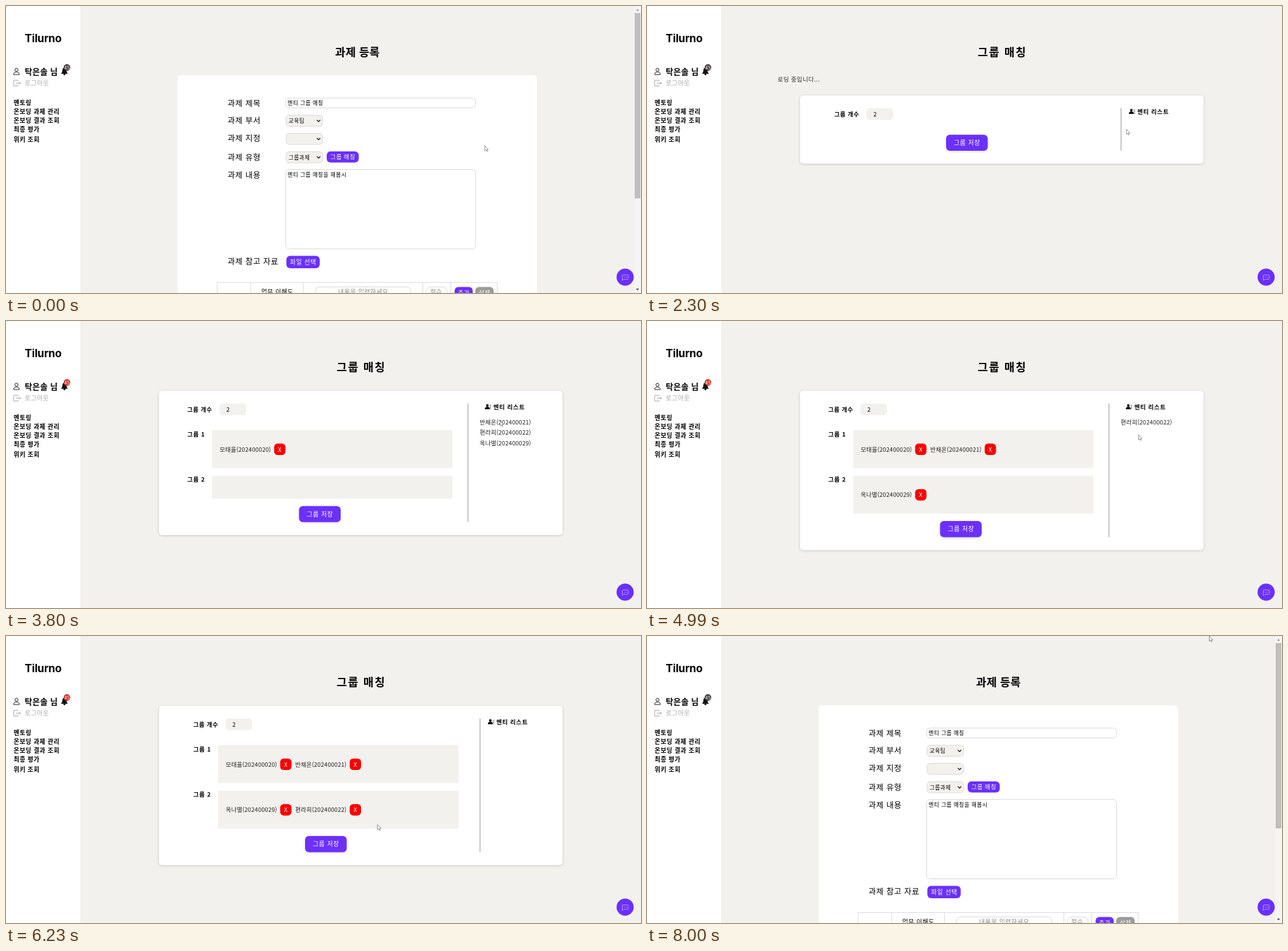
These frames come from a looping animation (1000 by 452 pixels, 8.11 s). An HTML page:

```html
<!DOCTYPE html>
<html lang="ko">
<head>
<meta charset="utf-8">
<title>그룹 매칭</title>
<style>
  html, body { margin: 0; width: 100%; height: 100%; overflow: hidden; background: #f3f1ed; }
  svg { display: block; width: 1000px; height: 452px; }
  text { font-family: "Noto Sans CJK KR", "Noto Sans CJK", "Noto Sans", sans-serif; white-space: pre; }
  .logo { font-family: Inter, sans-serif; }
  .raised { filter: drop-shadow(0 1.5px 2px rgba(0, 0, 0, .16)); }
</style>
</head>
<body>
<svg viewBox="0 0 1000 452">
  <g id="page"></g>
  <g id="sidebar"></g>
  <g id="chat">
    <circle cx="975" cy="427" r="13.5" fill="#6b30fa"/>
    <path d="M971.5 423.5h7q1.5 0 1.5 1.5v4q0 1.5-1.5 1.5h-5.5l-2.5 1.5v-7q0-1.5 1-1.5Z"
      fill="none" stroke="#cfc0ff" stroke-width=".7"/>
    <path d="M972.8 427h5" stroke="#cfc0ff" stroke-width=".9" stroke-dasharray="1 1"/>
  </g>
  <path id="cursor" d="M0 0V8.2L1.9 6.5L3.2 9.2L4.3 8.7L3.1 6.1H5.5Z"
    fill="#fff" stroke="#666" stroke-width=".7"/>
</svg>
<script>
const LOOP = 8110;
const PURPLE = '#6b30fa', FIELD = '#f3f1ed', BORDER = '#dadada';
const OPENED = 2040, LOADED = 2420, SAVED = 6600;

// Text is placed by its left edge (or anchor) and vertical centre.
function text(x, cy, content, size, { weight = 400, fill = '#000', gap = .5, anchor = 'start', cls = '' } = {}) {
  return `<text class="${cls}" x="${x}" y="${cy + size * .38}" font-size="${size}" font-weight="${weight}"
    fill="${fill}" letter-spacing="${gap}" text-anchor="${anchor}">${content}</text>`;
}
function box(x, y, w, h, r, fill, stroke = 'none', cls = '') {
  return `<rect class="${cls}" x="${x}" y="${y}" width="${w}" height="${h}" rx="${r}" fill="${fill}" stroke="${stroke}"/>`;
}
function path(d, stroke = '#111', width = 1, fill = 'none') {
  return `<path d="${d}" stroke="${stroke}" stroke-width="${width}" fill="${fill}"/>`;
}
function button(x, y, w, h, label, size, fill = PURPLE, cls = '') {
  return box(x, y, w, h, 6, fill, 'none', cls) +
    text(x + w / 2 + .3, y + h / 2, label, size, { fill: '#fff', anchor: 'middle', gap: .6 });
}

function sidebar(alert) {
  const menu = [['멘토링', 152], ['온보딩 과제 관리', 166], ['온보딩 결과 조회', 180.5], ['최종 평가', 194.5], ['위키 조회', 210]];
  return box(0, 0, 117, 452, 0, '#fff') +
    text(58.5, 51, 'Tilurno', 17, { weight: 700, gap: -.2, anchor: 'middle', cls: 'logo' }) +
    '<circle cx="16.5" cy="100.5" r="2.5" fill="none" stroke="#222"/>' +
    path('M12 108q0-4 4.5-4t4.5 4Z', '#222') +
    text(29.5, 103, '탁은솔 님', 12.8, { weight: 700, gap: .3 }) +
    path('M87 106.5q2-2 2-5q0-4 3-4t3 4q0 3 2 5Z', '#111', .5, '#111') +
    '<circle cx="92" cy="107.5" r="1.5"/>' +
    `<circle cx="96" cy="96.8" r="5.2" fill="${alert ? '#cc3024' : '#40383a'}"/>` +
    text(96, 97, '45', 7.5, { fill: '#fff', gap: 0, anchor: 'middle' }) +
    path('M19 118.5V117H12v9h7v-1.5M15.5 121.5H23M20.7 119.5l2.3 2l-2.3 2', '#aaa') +
    text(29.5, 121, '로그아웃', 10, { fill: '#aaa', gap: .3 }) +
    menu.map(([label, y]) => text(12, y, label, 9.7, { weight: 700, gap: .5 })).join('');
}

function select(y, value) {
  return box(441, y, 57.5, 17.5, 5, FIELD, '#dcdad6') + text(445, y + 9, value, 8.6) +
    path(`M489.5 ${y + 7.5}l2.7 2.7l2.7-2.7`, '#111', 1.3);
}

function formPage() {
  const labels = [['제목', 153], ['부서', 180], ['지정', 208.5], ['유형', 238], ['내용', 266], ['참고 자료', 402.5]];
  const hint = { fill: '#888' };
  return text(553.5, 72, '과제 등록', 17.5, { weight: 700, gap: .2, anchor: 'middle' }) +
    box(270, 109, 566, 400, 6, '#fff') +
    labels.map(([label, y]) => text(349, y, '과제 ' + label, 12.5)).join('') +
    box(440.5, 145, 299, 15.5, 5, '#fff', BORDER) + text(443.5, 152.5, '멘티 그룹 매칭', 8.6) +
    select(172, '교육팀') + select(200.5, '') + select(229.5, '그룹과제') +
    button(505, 229, 50.5, 17.5, '그룹 매칭', 9.2) +
    box(440.5, 257.5, 299, 125, 5, '#fff', BORDER) + text(443.5, 266, '멘티 그룹 매칭을 해봅시', 8.6) +
    button(441.5, 393.5, 52.5, 19.5, '파일 선택', 9.8) +
    path('M332 435.5H774M332.5 435V452M385.5 435V452M468.5 435V452M656.5 435V452M700.5 435V452M773.5 435V452', '#ddd') +
    text(402, 450, '업무 이해도', 9.8) +
    box(487.5, 442.5, 150, 18, 6, '#fff', BORDER) + text(523, 450.5, '내용을 입력하세요', 9.8, hint) +
    box(662, 442.5, 32.5, 18, 6, '#fff', BORDER) + text(668, 450.5, '점수', 9.8, hint) +
    button(706.5, 442.5, 28.5, 17, '추가', 9.4) + button(739, 442.5, 29, 17, '삭제', 9.4, '#9b9b9b') +
    box(989, 0, 11, 452, 0, '#f5f5f5') + box(990, 11, 9, 292, 0, '#bfbfbf') +
    path('M992 7.5h5l-2.5-3Z', 'none', 0, '#999') + path('M992 445h5l-2.5 3Z', 'none', 0, '#555');
}

const people = {
  mo: '모태율(202400020)', ban: '반채온(202400021)', pyeon: '편라희(202400022)', ok: '옥나별(202400029)'
};
const drops = [[3530, 'mo', 0], [4090, 'ban', 0], [4450, 'ok', 1], [5400, 'pyeon', 1]];

function member(id, x, cy) {
  return text(x, cy, people[id], 9.3, { gap: .18, fill: '#222' }) +
    box(x + 85.8, cy - 9, 17.8, 18, 5.5, '#f80000') +
    text(x + 94.7, cy + .3, 'X', 9, { fill: '#fff', gap: 0, anchor: 'middle' });
}

function groupPage(loaded, dropped) {
  const top = loaded ? 110 : 141;
  const waiting = loaded ? Object.keys(people).filter(id => !dropped.some(d => d[1] === id)) : [];
  const shift = waiting.length ? 0 : 9.5;
  const bold = { weight: 700, gap: .65 };
  let y = top + 62, groups = '';
  for (const index of loaded ? [0, 1] : []) {
    const members = dropped.filter(d => d[2] === index);
    const height = members.length ? 59.7 : 36;
    groups += text(285.5 + shift, y + 6, '그룹 ' + (index + 1), 9.4, bold) +
      box(324.5 + shift, y, 378.5, height, 0, FIELD) +
      members.map((d, i) => member(d[1], 336.5 + shift + i * 109.5, y + 30)).join('');
    y += height + 12;
  }
  const iconX = 754 + shift / 2, iconY = top + 25;
  return text(559.5, 72, '그룹 매칭', 17.5, { weight: 700, gap: 1.6, anchor: 'middle' }) +
    (loaded ? '' : text(205.5, 115.5, '로딩 중입니다...', 9.6, { gap: .3, fill: '#333' })) +
    box(241, top, 635.5, y + 45.3 - top, 5, '#fff', 'none', 'raised') +
    text(285.5 + shift, top + 29.5, '그룹 개수', 9.2, { weight: 700, gap: .55 }) +
    box(336 + shift, top + 20, 42, 18.5, 5, FIELD) + text(347 + shift, top + 30, '2', 9.2) +
    groups +
    button(461.5 + shift, y - .3, 65.5, 25.3, '그룹 저장', 9.8, PURPLE, 'raised') +
    path(`M${727.5 + shift * 2} ${top + 20}V${y + 25}`, '#999') +
    `<circle cx="${iconX + 4}" cy="${iconY - 2}" r="2"/>` +
    path(`M${iconX} ${iconY + 4}q0-4 4-4t4 4Z`, 'none', 0, '#111') +
    path(`M${iconX + 7.5} ${iconY - 2}h2.5m-2 2.5h2m-1.5 2.5h1.5`, '#333', .9) +
    text(767.5 + shift / 2, top + 25.5, '멘티 리스트', 9.4, bold) +
    waiting.map((id, i) => text(746, top + 49 + i * 16.5, people[id], 9.3, { gap: .18, fill: '#222' })).join('');
}

// Pointer stops: time, x, y.
const stops = [
  [0, 754, 220], [30, 754, 220], [710, 774, 189], [1220, 774, 189], [1800, 536, 239], [1910, 530, 240],
  [2040, 552, 235], [2300, 755, 194], [2420, 755, 194], [2720, 780, 160], [2970, 780, 160], [3040, 750, 165],
  [3250, 750, 165], [3500, 480, 190], [3560, 480, 190], [3800, 778, 157], [3940, 778, 157], [4090, 510, 200],
  [4270, 776, 174], [4450, 480, 262], [4610, 774, 179], [5000, 774, 179], [5120, 780, 160], [5400, 500, 272],
  [5650, 592, 290], [6140, 592, 290], [6230, 585, 297], [6270, 585, 297], [6440, 508, 326], [6600, 508, 326],
  [6920, 560, 300], [7170, 560, 300], [7200, 575, 290], [7420, 575, 290], [8000, 885.5, 0], [LOOP, 885.5, 0]
];

function pointerAt(time) {
  const next = Math.max(1, stops.findIndex(s => s[0] > time));
  const [t0, x0, y0] = stops[next - 1], [t1, x1, y1] = stops[next];
  const p = (time - t0) / (t1 - t0), eased = p * p * (3 - 2 * p);
  return [x0 + (x1 - x0) * eased, y0 + (y1 - y0) * eased];
}

const byId = id => document.getElementById(id);
const start = performance.now();
let shown = '';

function draw() {
  const time = (performance.now() - start) % LOOP;
  const matching = time >= OPENED && time < SAVED;
  const loaded = matching && time >= LOADED;
  const dropped = drops.filter(d => time >= d[0]);
  const state = [matching, loaded, matching && dropped.length].join();
  if (state !== shown) {
    shown = state;
    byId('page').innerHTML = matching ? groupPage(loaded, dropped) : formPage();
    byId('sidebar').innerHTML = sidebar(loaded);
  }
  byId('cursor').setAttribute('transform', `translate(${pointerAt(time)})`);
  requestAnimationFrame(draw);
}
draw();
</script>
</body>
</html>
```
